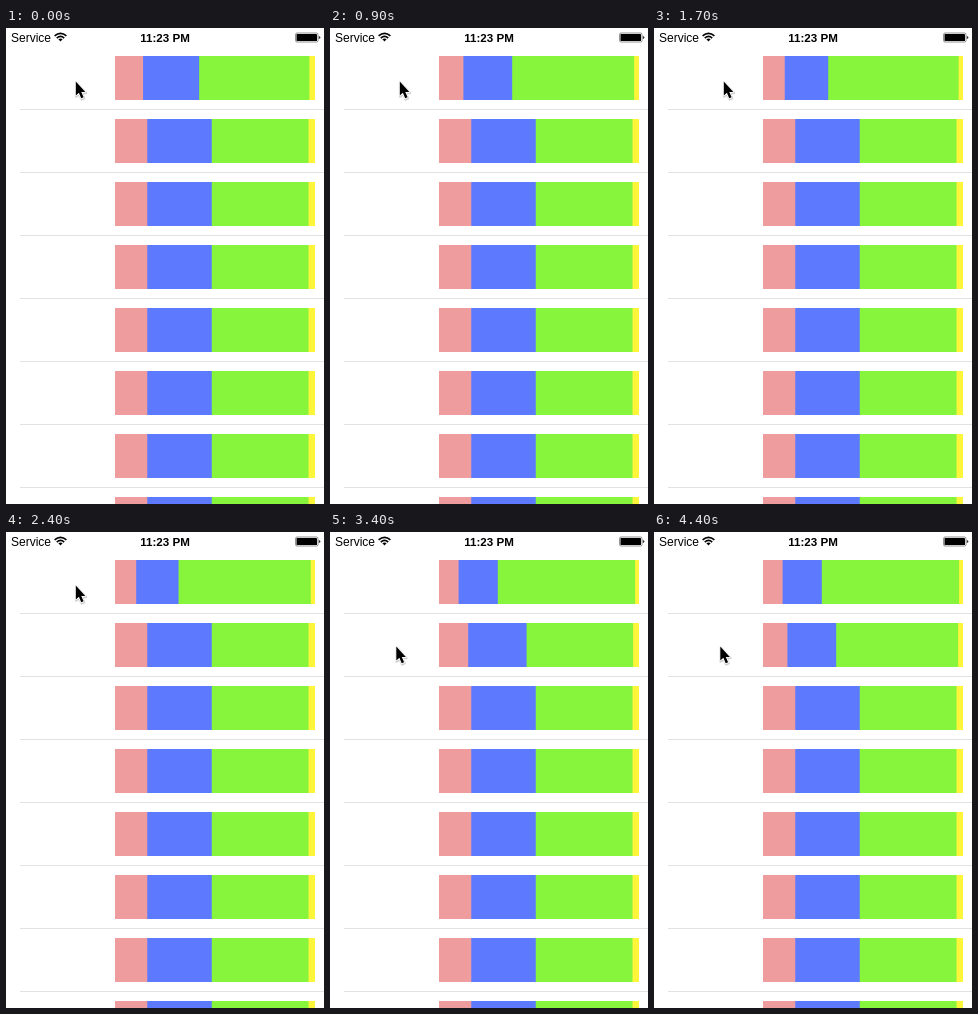
Write an HTML page that moves like this. It is 318x476 px and loops after 4800 ms.

```html
<!DOCTYPE html>
<html lang="en">
<head>
<meta charset="utf-8">
<title>Stacked bars</title>
<style>
  html, body { margin: 0; width: 100%; height: 100%; overflow: hidden; background: #fff; }
  svg { display: block; width: 100%; height: 100%; }
  text { font-family: "Liberation Sans", Arial, sans-serif; font-size: 12px; }
  .clock { font-size: 11.6px; font-weight: bold; text-anchor: middle; }
</style>
</head>
<body>
<svg viewBox="0 0 318 476">
  <g id="rows"></g>

  <text x="5" y="14">Service</text>
  <g fill="none" stroke="#000" stroke-width="1.7">
    <path d="M48.6 7.9 Q54.5 2.9 60.4 7.9"/>
    <path d="M50.8 10.1 Q54.5 6.8 58.2 10.1"/>
  </g>
  <path d="M52.4 11.3 Q54.5 9.6 56.6 11.3 L54.5 13.5 Z"/>
  <text class="clock" x="159" y="13.6">11:23 PM</text>
  <rect x="289.5" y="5" width="22.5" height="9" rx="1.5" fill="#fff" stroke="#666" stroke-width=".7"/>
  <rect x="290.5" y="6" width="20.5" height="7" rx=".6"/>
  <path d="M312.8 8 Q314.4 8.2 314.4 9.5 T312.8 11 Z" fill="#333"/>

  <g id="cursor" stroke-linejoin="round">
    <path id="arrow" d="M0 0 V14 L3.1 11.2 L5.4 16.8 L7.8 15.8 L5.5 10.4 H9.6 Z"
          transform="translate(.4 1)" fill="#000" stroke="#000" stroke-width="2.6" opacity=".18"/>
    <use href="#arrow" visibility="hidden"/>
    <path d="M0 0 V14 L3.1 11.2 L5.4 16.8 L7.8 15.8 L5.5 10.4 H9.6 Z"
          stroke="#fff" stroke-width="1.6" paint-order="stroke"/>
  </g>
</svg>
<script>
  const LOOP = 4800, TICK = 100, TAP_MS = 400;
  const LEFT = 109, WIDTH = 200, PITCH = 63;
  const COLORS = ['#ef9c9f', '#5d7aff', '#87f53c', '#fdf53a'];
  // Each tap adds one to the green value of its row.
  const TAPS = [[-340, 460, 1290, 2266], [3150, 3940]];

  const rowsGroup = document.getElementById('rows');
  const cursor = document.getElementById('cursor');

  function addRect(x, y, width, height, fill) {
    const rect = document.createElementNS('http://www.w3.org/2000/svg', 'rect');
    Object.entries({ x, y, width, height, fill })
      .forEach(([name, value]) => rect.setAttribute(name, value));
    rowsGroup.append(rect);
    return rect;
  }

  // Right edges of the four segments, measured from the bar's left.
  function edges(green) {
    const scale = WIDTH / (3.2 + green);
    return [1, 3, 3 + green, 3.2 + green].map(sum => sum * scale);
  }

  function addRow(index) {
    const top = 28 + index * PITCH;
    const widths = edges(3);
    addRect(14, top + 53, 304, 1, '#e2e2e4');
    const bars = [];
    for (let i = 3; i >= 0; i--) bars[i] = addRect(LEFT, top, widths[i], 44, COLORS[i]);
    return bars;
  }

  const rows = Array.from({ length: 8 }, (_, i) => addRow(i));

  function drawRow(bars, taps, time) {
    const started = taps.filter(tap => tap <= time);
    const green = 3 + started.length;
    const last = started.length ? started[started.length - 1] : -Infinity;
    const p = Math.min(1, (time - last) / TAP_MS);
    const eased = p * p * (3 - 2 * p);
    const from = edges(Math.max(3, green - 1)), to = edges(green);
    bars.forEach((bar, i) => bar.setAttribute('width', from[i] + (to[i] - from[i]) * eased));
  }

  function cursorAt(time) {
    if (time < 2900) return [69.8, 53.5];
    if (time < 3000) return [68.3, 85];
    return time < 3100 ? [67.2, 114.5] : [66.3, 114.5];
  }

  function draw(now) {
    const time = Math.floor(now % LOOP / TICK) * TICK;
    TAPS.forEach((taps, i) => drawRow(rows[i], taps, time));
    cursor.setAttribute('transform', `translate(${cursorAt(time)})`);
    requestAnimationFrame(draw);
  }

  draw(performance.now());
</script>
</body>
</html>
```
